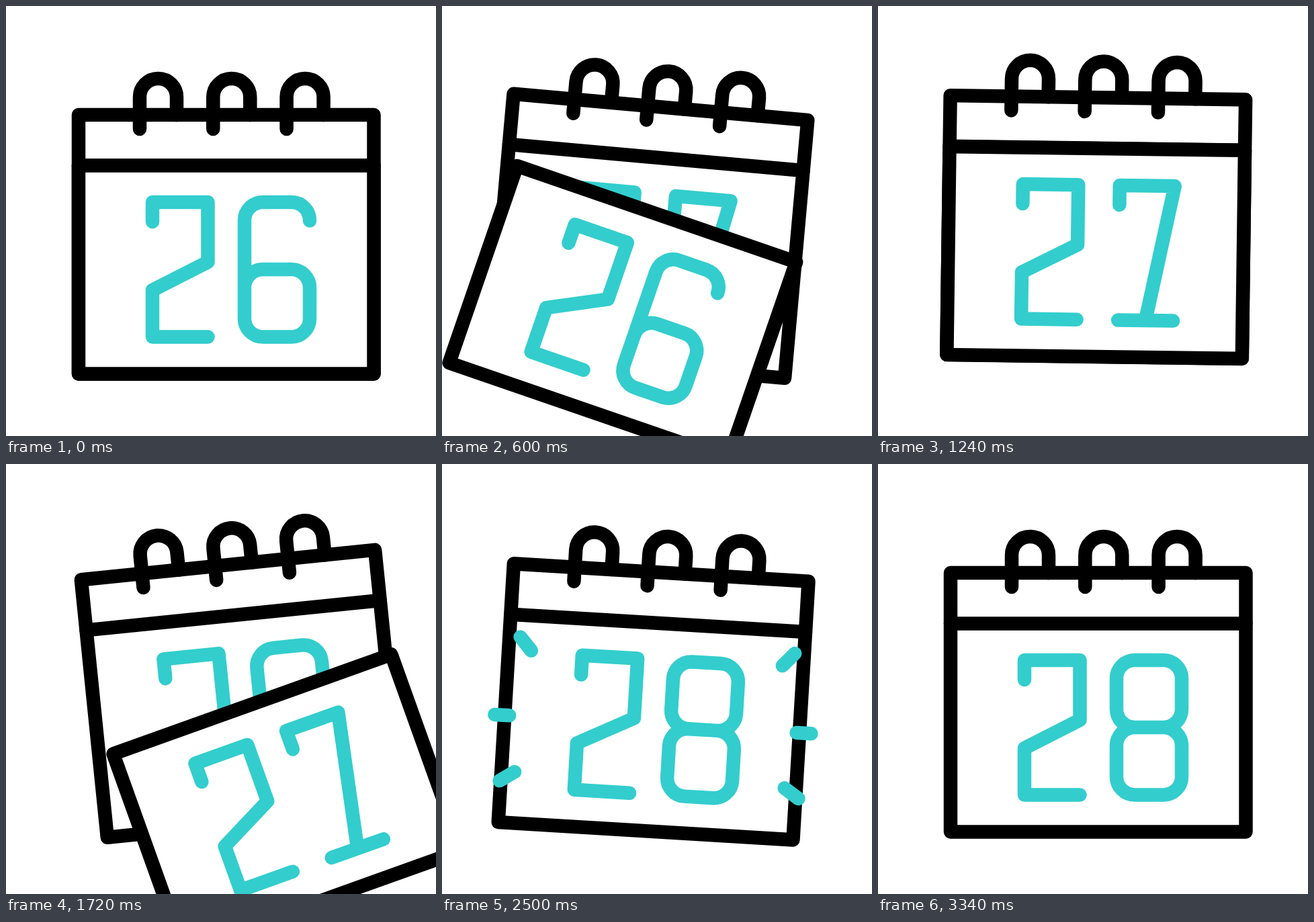
These frames come from a looping animation (640 px wide and 640 px high, 3600 ms). An HTML page with a canvas:

```html
<!DOCTYPE html>
<html lang="en">
<head>
<meta charset="utf-8">
<title>Calendar</title>
<style>
html, body { margin: 0; width: 100%; height: 100%; overflow: hidden; background: #fff; }
canvas { display: block; width: 100vmin; height: 100vmin; }
</style>
</head>
<body>
<canvas id="stage" width="640" height="640"></canvas>
<script>
const ctx = document.getElementById('stage').getContext('2d');
const LOOP = 3600, STEP = 20, REST = 3340;
const INK = '#000', TEAL = '#33cdcd';
const RAD = Math.PI / 180;
const PIVOT = [336, 135.5], MID = [327.5, 392];

const smooth = x => x * x * (3 - 2 * x);
const clamp = x => Math.min(1, Math.max(0, x));

// [time, value] keys, eased between neighbours
const swing = [[100, 0], [480, 4.96], [1050, 6.2], [1450, -5.46], [2020, -6.2],
  [2410, 4.35], [2790, -2.1], [3060, 2.3], [3400, 0]];
const lift = [[110, 0], [1205, -25.7], [2225, 0]];

// [time since tear, x, y, degrees] for a page leaving to the right
const tearLeft = [[0, 0, 0, 0], [260, 7, 22, -5], [500, 29, 79, -13.9],
  [820, 170, 165, -28.3], [1020, 640, 330, -45]];
const tearRight = [[0, 0, 0, 0], [260, 12, 40, -5], [500, 52, 130, -13.9],
  [820, 190.5, 182, -28.3], [1020, 640, 330, -45]];

function eased(keys, t) {
  if (t <= keys[0][0]) return keys[0][1];
  for (let i = 1; i < keys.length; i++) {
    const [a, va] = keys[i - 1], [b, vb] = keys[i];
    if (t < b) return va + (vb - va) * smooth((t - a) / (b - a));
  }
  return keys[keys.length - 1][1];
}

// cubic path through the keys, starting at rest
function spline(keys, t, col) {
  const last = keys.length - 1;
  t = Math.min(Math.max(t, 0), keys[last][0]);
  let i = 0;
  while (i < last - 1 && t > keys[i + 1][0]) i++;
  const slope = k => {
    if (k === 0) return 0;
    const p = keys[k - 1], n = keys[Math.min(k + 1, last)];
    return (n[col] - p[col]) / (n[0] - p[0]);
  };
  const a = keys[i], b = keys[i + 1], h = b[0] - a[0], u = (t - a[0]) / h;
  const s = smooth(u);
  return a[col] * (1 - s) + b[col] * s +
    h * u * (1 - u) * ((1 - u) * slope(i) - u * slope(i + 1));
}

const digits = {
  2: new Path2D('M218 321V292H300.5V381L218 423V492.5H300.5'),
  6: new Path2D('M452 319.5A27 27 0 0 0 425 292H382A27 27 0 0 0 355 319V465A27 27 0 0 0 382 492.5' +
    'H425A27 27 0 0 0 452 465V419A27 27 0 0 0 425 392H382A27 27 0 0 0 355 419'),
  7: new Path2D('M362 321V292H444L403 492M362 492.5H444'),
  8: new Path2D()
};
digits[8].roundRect(355, 292, 97, 100, 27);
digits[8].roundRect(355, 392, 97, 100.5, 27);

const hook = new Path2D('M199 183V135.5A27.5 27.5 0 0 1 254 135.5V162');
const header = new Path2D('M108 237.5H547.5');

function turn(deg, [x, y], dx, dy) {
  ctx.translate(x + dx, y + dy);
  ctx.rotate(deg * RAD);
  ctx.translate(-x, -y);
}

function stroke(path, color) {
  ctx.strokeStyle = color;
  ctx.stroke(path);
}

function sheet(y, digit) {
  const box = new Path2D();
  box.rect(108, y, 439.5, 547.5 - y);
  ctx.fillStyle = '#fff';
  ctx.fill(box);
  stroke(box, INK);
  stroke(digits[2], TEAL);
  stroke(digits[digit], TEAL);
}

function calendar(digit) {
  sheet(162, digit);
  stroke(header, INK);
  for (let i = 0; i < 3; i++) {
    ctx.save();
    ctx.translate(i * 109.3, 0);
    stroke(hook, INK);
    ctx.restore();
  }
}

// side: -1 leaves to the left, 1 to the right
function page(digit, keys, t, side) {
  const [x, y, deg] = [1, 2, 3].map(col => spline(keys, t, col));
  ctx.save();
  turn(side * deg, MID, side * x, y);
  sheet(237.5, digit);
  ctx.restore();
}

// short dashes that shoot out on both sides
function sparks(t) {
  const head = clamp((t - 2400) / 90), tail = clamp((t - 2510) / 90);
  if (head <= 0 || tail >= 1) return;
  const rays = [[196, 280, 26, -48], [225, 388, 22, 0], [212, 478.5, 26, 33.5]];
  ctx.strokeStyle = TEAL;
  for (const side of [-1, 1]) {
    for (const [x, y, len, deg] of rays) {
      const c = Math.cos(deg * RAD) * len, s = Math.sin(deg * RAD) * len;
      ctx.beginPath();
      for (const k of [tail - 0.5, head - 0.5]) ctx.lineTo(329 + side * (x + c * k), y + s * k);
      ctx.stroke();
    }
  }
}

function draw(t) {
  ctx.setTransform(1, 0, 0, 1, 0, 0);
  ctx.fillStyle = '#fff';
  ctx.fillRect(0, 0, 640, 640);
  ctx.lineWidth = 20.5;
  ctx.lineCap = ctx.lineJoin = 'round';
  if (t < REST) turn(eased(swing, t), PIVOT, 0, eased(lift, t));
  calendar(t < 1180 ? 7 : 8);
  if (t < 1160) page(6, tearLeft, t - 100, -1);
  else if (t >= 1180 && t < 2240) page(7, tearRight, t - 1220, 1);
  else if (t < 1180) page(7, tearRight, 0, 1);
  sparks(t);
}

const start = performance.now();
function tick() {
  const t = (performance.now() - start) % LOOP;
  draw(Math.floor(t / STEP) * STEP);
  requestAnimationFrame(tick);
}
tick();
</script>
</body>
</html>
```
